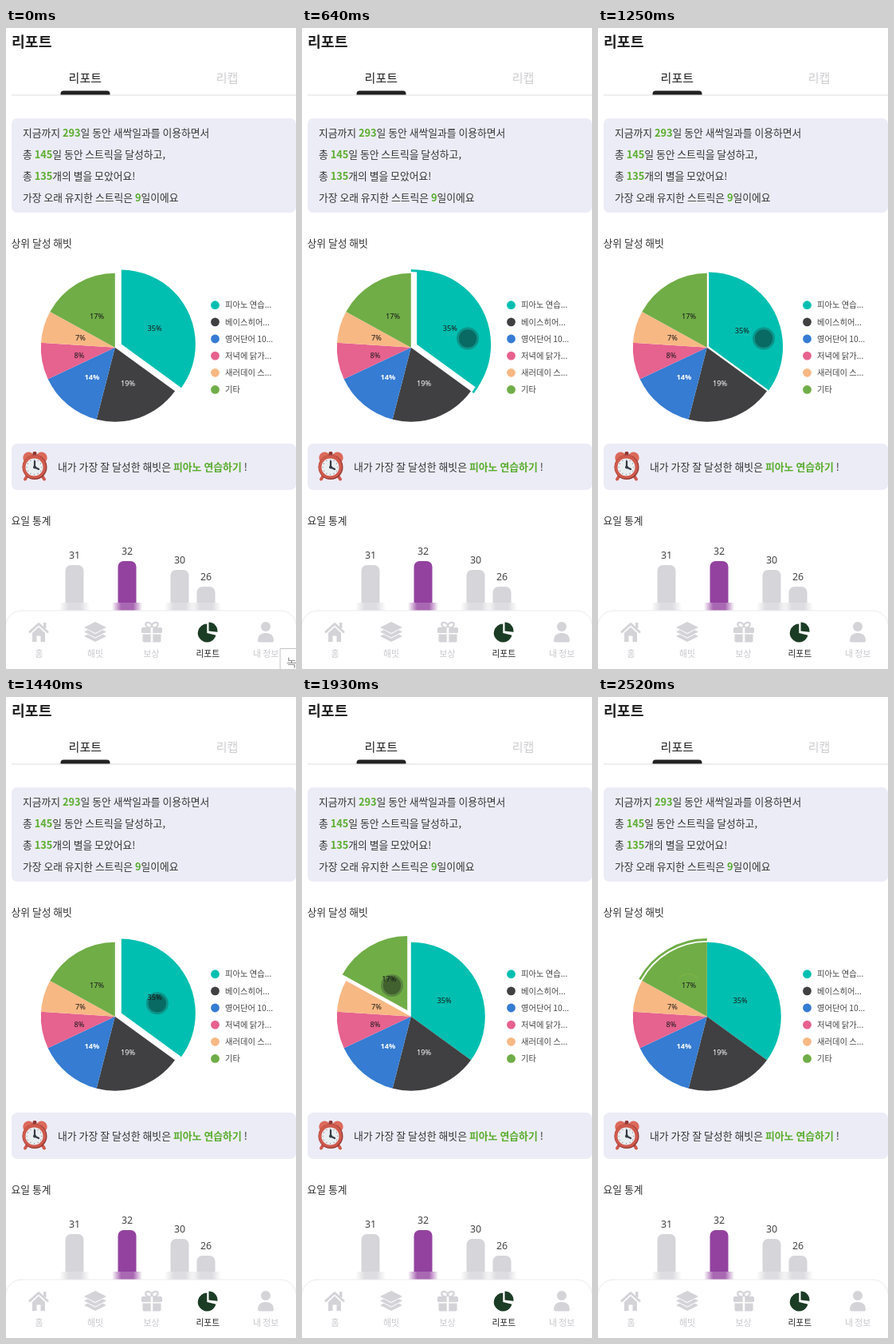
Recreate the animation shown at these times as an HTML page with a canvas. Size 364 by 802 pixels, loop 2.75 s.

```html
<!DOCTYPE html>
<html lang="ko">
<head>
<meta charset="utf-8">
<title>리포트</title>
<style>
html, body { margin: 0; width: 100%; height: 100%; overflow: hidden; background: #fff; }
canvas { display: block; width: 364px; height: 802px; }
</style>
</head>
<body>
<canvas id="stage"></canvas>
<script>
const W = 364, H = 802, LOOP = 2750;
const canvas = document.getElementById('stage');
const dpr = window.devicePixelRatio || 1;
canvas.width = W * dpr;
canvas.height = H * dpr;
const c = canvas.getContext('2d');

const KR = '"Noto Sans CJK KR", "Noto Sans CJK", sans-serif';
const LATIN = '"Noto Sans", sans-serif';
const INK = '#333', ACCENT = '#5bad2f', CARD = '#ececf7', PALE = '#d5d5da';
const PIE = { x: 136.8, y: 399.7, r: 93, pull: 9 };
const PRESSES = [510, 1030, 1600, 2210];

// share, colour, label colour, label centre
const slices = [
  [35, '#00bfb0', '#181818', 178.5, 379.5, '피아노 연습...'],
  [19, '#404042', '#fff', 153, 444.5, '베이스히어...'],
  [14, '#357cd2', '#fff', 108, 436.5, '영어단어 10...'],
  [8, '#e6628f', '#181818', 92, 409.5, '저녁에 닭가...'],
  [7, '#f8b884', '#181818', 93.5, 387.5, '새러데이 스...'],
  [17, '#70ad47', '#181818', 114, 360.5, '기타']
];
const bars = [
  [74.5, 672, PALE, 31], [140.5, 667, '#93429f', 32],
  [206.5, 678, PALE, 30], [239.5, 699, PALE, 26]
];

const clamp = v => Math.max(0, Math.min(1, v));
const ramp = (t, a, b) => clamp((t - a) / (b - a));

function text(s, x, y, size, color, weight = 400, align = 'left', family = KR) {
  c.font = `${weight} ${size}px ${family}`;
  c.fillStyle = color;
  c.textAlign = align;
  c.textBaseline = 'alphabetic';
  c.fillText(s, x, y);
  return c.measureText(s).width;
}

// Parts between asterisks are green and bold.
function rich(s, x, y, size) {
  s.split('*').forEach((part, i) => {
    x += text(part, x, y, size, i % 2 ? ACCENT : INK, i % 2 ? 700 : 400);
  });
}

function box(x, y, w, h, r, color) {
  c.beginPath();
  c.roundRect(x, y, w, h, r);
  c.fillStyle = color;
  c.fill();
}

function disc(x, y, r, color) {
  c.beginPath();
  c.arc(x, y, r, 0, 7);
  c.fillStyle = color;
  c.fill();
}

function wedge(x, y, r, from, to, color) {
  c.beginPath();
  c.moveTo(x, y);
  c.arc(x, y, r, from, to);
  c.closePath();
  c.fillStyle = color;
  c.fill();
}

function poly(points, color) {
  c.beginPath();
  points.forEach(([x, y]) => c.lineTo(x, y));
  c.closePath();
  c.fillStyle = color;
  c.fill();
}

function line(points, width, color) {
  c.beginPath();
  points.forEach(([x, y]) => c.lineTo(x, y));
  c.lineWidth = width;
  c.lineCap = c.lineJoin = 'round';
  c.strokeStyle = color;
  c.stroke();
}

function header() {
  text('리포트', 7, 23.5, 18.3, '#222', 700);
  text('리포트', 99.3, 67.5, 15, '#222', 500, 'center');
  text('리캡', 277.5, 67.5, 15, '#cdcdd0', 500, 'center');
  box(7, 83.5, 357, 1, 0, '#dedede');
  box(68.5, 78.5, 62, 5, [4, 4, 0, 0], '#222');
  box(7, 113, 357, 118, 7, CARD);
  ['지금까지 *293*일 동안 새싹일과를 이용하면서',
   '총 *145*일 동안 스트릭을 달성하고,',
   '총 *135*개의 별을 모았어요!',
   '가장 오래 유지한 스트릭은 *9*일이에요'
  ].forEach((s, i) => rich(s, 21, 135.7 + i * 27, 12.8));
  text('상위 달성 해빗', 6.5, 273.7, 12.8, INK);
}

function pie(pulls, ringOn) {
  let at = -Math.PI / 2;
  slices.forEach(([share, color, ink, lx, ly], i) => {
    const end = at + share / 50 * Math.PI, mid = (at + end) / 2;
    const d = PIE.pull * (pulls[i] || 0);
    const dx = Math.cos(mid) * d, dy = Math.sin(mid) * d;
    wedge(PIE.x + dx, PIE.y + dy, PIE.r, at, end, color);
    if (ringOn === i) {
      c.beginPath();
      c.arc(PIE.x, PIE.y, 96.2, at, end);
      c.lineWidth = 2.8;
      c.lineCap = 'butt';
      c.strokeStyle = color;
      c.stroke();
    }
    text(share + '%', lx + dx, ly + dy + 3.4, 9.2, ink, share === 14 ? 600 : 400, 'center', LATIN);
    at = end;
  });
}

function legend() {
  slices.forEach(([, color, , , , name], i) => {
    const y = 346.7 + i * 21.15;
    disc(262.5, y, 5.4, color);
    text(name, 275, y + 3.7, 10.3, '#444');
  });
}

function clock() {
  const red = '#cf5a4c', dark = '#8e3733';
  line([[27, 560], [24, 564.5]], 4, red);
  line([[45, 560], [48, 564.5]], 4, red);
  for (const [x, a] of [[27, -0.7], [46, 0.7]]) {
    c.save();
    c.translate(x, 536);
    c.rotate(a);
    box(-7, -5, 14, 9, [7, 7, 1, 1], '#dc6a5a');
    c.restore();
  }
  box(33.5, 530, 5, 5, 2, dark);
  disc(36, 549.5, 15.5, dark);
  disc(35.5, 549, 14.8, red);
  disc(35.5, 549.5, 11, '#e9eef1');
  for (let i = 0; i < 12; i++) {
    const a = i * Math.PI / 6;
    disc(35.5 + 9.2 * Math.cos(a), 549.5 + 9.2 * Math.sin(a), 0.6, '#7b8790');
  }
  line([[36, 542], [36, 549.5], [41, 552]], 2.2, '#343a44');
  disc(36, 549.5, 2, '#343a44');
}

function stats() {
  box(7, 520, 357, 58, 7, CARD);
  clock();
  rich('내가 가장 잘 달성한 해빗은 *피아노 연습하기* !', 65, 553.7, 12.9);
  text('요일 통계', 6.5, 620.7, 12.8, INK);
  for (const [x, y, color, n] of bars) {
    const mid = x + 11.5;
    box(x, y, 23, 719 - y, [7, 7, 0, 0], color);
    text(n, mid, y - 8.5, 12.4, '#444', 400, 'center', LATIN);
    // The bar is blurred just above the navigation.
    const g = c.createLinearGradient(mid - 19, 0, mid + 19, 0);
    g.addColorStop(0, color + '00');
    g.addColorStop(0.3, color + 'cc');
    g.addColorStop(0.7, color + 'cc');
    g.addColorStop(1, color + '00');
    box(mid - 19, 719, 38, 11, 0, g);
  }
}

function icons() {
  const g = '#d3d3d8', w = '#fff';
  // home
  line([[30, 755.5], [41, 745.5], [52, 755.5]], 3, g);
  box(47, 744, 3.5, 7, 0, g);
  poly([[33, 757], [41, 749.5], [49, 757], [49, 768], [33, 768]], g);
  box(38.5, 760.5, 5, 7.5, 0, w);
  // layers
  for (const y of [761, 755.5, 750]) {
    const rhomb = k => [[112, y - 7 - k], [126 + k, y], [112, y + 7 + k], [98 - k, y]];
    poly(rhomb(1.2), w);
    poly(rhomb(0), g);
  }
  // gift
  c.lineWidth = 2.2;
  c.strokeStyle = g;
  for (const s of [-1, 1]) {
    c.beginPath();
    c.ellipse(183 + s * 4, 747, 4, 3, s * -0.5, 0, 7);
    c.stroke();
  }
  box(170, 750, 26, 7, 1.5, g);
  box(171.5, 758.5, 23, 10, [0, 0, 2, 2], g);
  box(181.7, 750, 2.6, 18.5, 0, w);
  // report
  const green = '#1c3d25';
  wedge(252.3, 757, 11.5, 0.25, Math.PI * 1.5, green);
  wedge(254.5, 754.5, 11, -Math.PI / 2, 0.12, green);
  // profile
  disc(326, 749, 6, g);
  box(316, 757, 20, 11.5, [9, 9, 3, 3], g);
}

function nav() {
  box(-0.5, 729, 365, 90, 20, '#fff');
  c.lineWidth = 1;
  c.strokeStyle = '#ebebed';
  c.stroke();
  icons();
  [['홈', 41.5], ['해빗', 112], ['보상', 182.5], ['리포트', 253.3], ['내 정보', 326]]
    .forEach(([s, x], i) =>
      text(s, x, 787, 10.8, i === 3 ? '#222' : '#c8c8cd', 500, 'center'));
}

function tip(alpha) {
  if (!alpha) return;
  c.save();
  c.globalAlpha = alpha;
  box(344.5, 776.5, 40, 40, 0, '#fff');
  c.lineWidth = 1;
  c.strokeStyle = '#c4c4c4';
  c.stroke();
  text('녹화', 352, 798.5, 14, '#8a8a8a');
  c.restore();
}

// A press flashes lime, then quickly fades.
const flash = (t, start) => t < start ? 0 : 1 - ramp(t, start + 70, start + 95);

function pointer(t) {
  const move = ramp(t, 1420, 1530);
  const x = 208 - 95 * move, y = 388.5 - 27.5 * move;
  const shade = t < 450 ? 0 : 1 - ramp(t, 2400, 2520);
  const glow = Math.max(...PRESSES.map(start => flash(t, start)));
  disc(x, y, 14, `rgba(40,50,50,${0.3 * shade})`);
  disc(x, y, 11.2, `rgba(0,0,0,${0.28 * shade})`);
  disc(x, y, 15, `rgba(142,200,44,${0.8 * glow})`);
  if (t >= 2400) {
    c.beginPath();
    c.arc(x, y, 14.5, Math.PI * 1.2, Math.PI * 1.85);
    c.lineWidth = 1;
    c.strokeStyle = 'rgba(150,195,60,.45)';
    c.stroke();
  }
}

function draw(t) {
  const teal = 1 - ramp(t, 620, 870) + ramp(t, 1180, 1430) - ramp(t, 1690, 1930);
  const green = ramp(t, 1690, 1930) - ramp(t, 2280, 2520);
  const ring = t >= 600 && t < 1180 ? 0 : t >= 2270 ? 5 : -1;
  c.setTransform(dpr, 0, 0, dpr, 0, 0);
  c.fillStyle = '#fff';
  c.fillRect(0, 0, W, H);
  header();
  pie({ 0: teal, 5: green }, ring);
  pointer(t);
  legend();
  stats();
  nav();
  tip(t < 30 ? 1 : t < 60 ? 0.5 : 0);
}

const start = performance.now();
function tick() {
  draw((performance.now() - start) % LOOP);
  requestAnimationFrame(tick);
}
tick();
</script>
</body>
</html>
```
